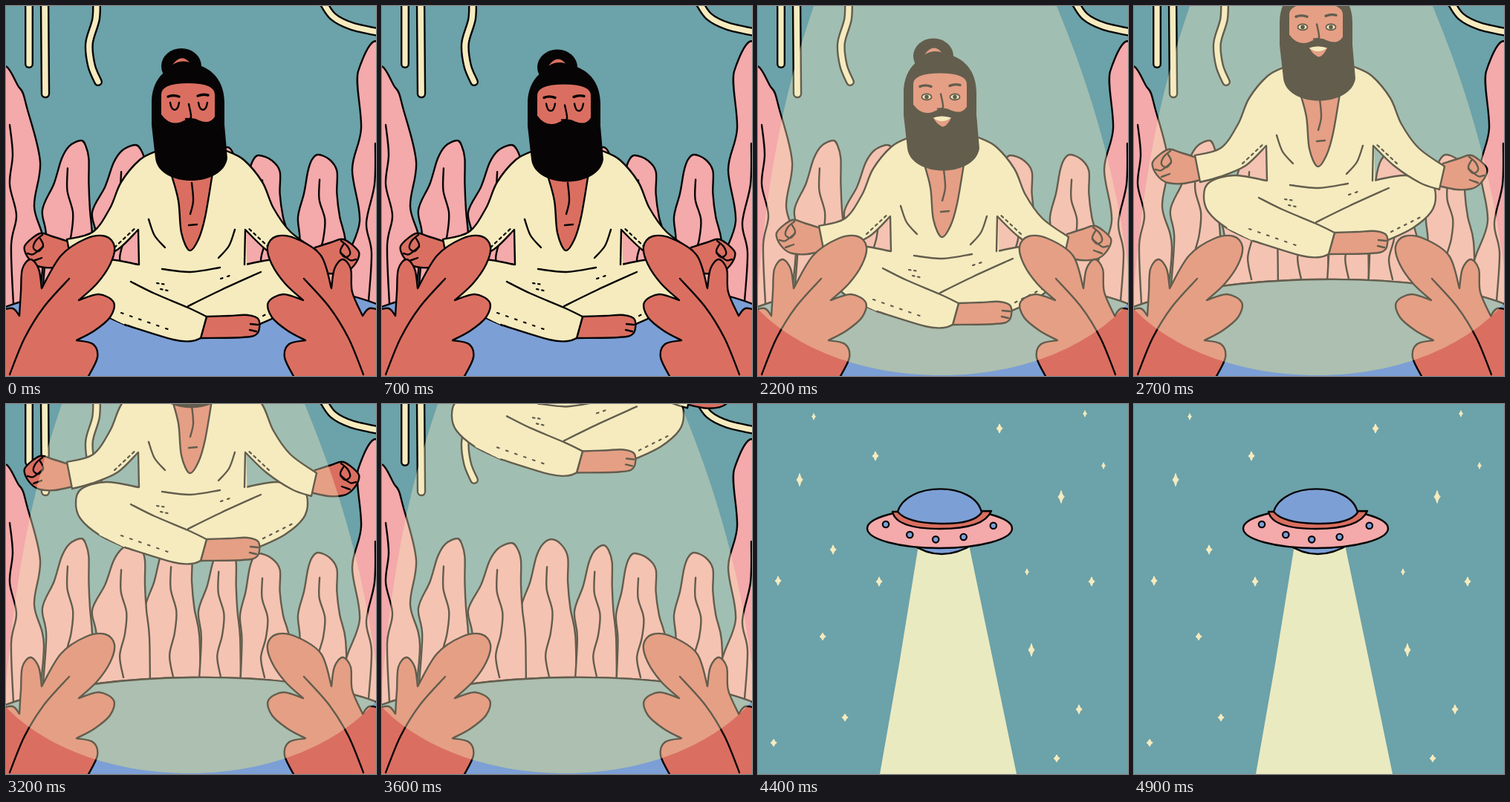
These frames come from a looping animation (498 by 498 pixels, 5000 ms). An HTML page:

```html
<!DOCTYPE html>
<html lang="en">
<head>
<meta charset="utf-8">
<title>Lifted</title>
<style>
  html, body { margin: 0; width: 100%; height: 100%; overflow: hidden; background: #6ca2a9; }
  svg { display: block; width: 100vw; height: 100vh; }
  path, circle, ellipse { stroke-linecap: round; stroke-linejoin: round; }
</style>
</head>
<body>
<svg id="stage" viewBox="0 0 498 498"></svg>
<script>
const INK = '#060405', SKY = '#6ca2a9', PINK = '#f4a9aa', CREAM = '#f5ebbe',
      SKIN = '#da6f61', FLOOR = '#7c9fd6', LIT_FLOOR = '#7da3a7', WEIGHT = 2.4;
const LOOP = 5000, STEP = 100, BEAM_ON = 2000, CUT = 3700;

const stage = document.getElementById('stage');
let layer = stage;

function el(tag, attrs, parent = layer) {
  const node = document.createElementNS('http://www.w3.org/2000/svg', tag);
  for (const k in attrs) node.setAttribute(k, attrs[k]);
  parent.appendChild(node);
  return node;
}
const group = (parent, attrs = {}) => (layer = el('g', attrs, parent));

// Smooth curve through the points; "|" marks a corner. Path data passes through.
function curve(text) {
  if (text[0] === 'M') return text;
  let d = '', last = null;
  for (const part of text.split('|')) {
    const p = part.trim().split(/\s+/).map(s => s.split(',').map(Number));
    if (last) p.unshift(last);
    else d = 'M' + p[0];
    for (let i = 0; i < p.length - 1; i++) {
      const a = p[i - 1] || p[i], b = p[i], c = p[i + 1], e = p[i + 2] || c;
      const at = (q, r, s, k) => [0, 1].map(n => (q[n] + k * (s[n] - r[n]) / 6).toFixed(1));
      d += `C${at(b, a, c, 1)} ${at(c, b, e, -1)} ${c}`;
    }
    last = p[p.length - 1];
  }
  return d;
}
const fill = (pts, color) => el('path', { d: curve(pts), fill: color });
const line = (pts, w = WEIGHT, color = INK) =>
  el('path', { d: curve(pts), fill: 'none', stroke: color, 'stroke-width': w });
const shape = (pts, color) => { fill(pts, color); line(pts); };
const lines = (...all) => all.forEach(p => line(p));
const sky = () => el('rect', { width: 498, height: 498, fill: SKY });

// Draws a part and its mirror image about x = axis / 2.
function pair(axis, part) {
  const home = layer;
  for (const k of [0, 1]) {
    group(home, k ? { transform: `translate(${axis} 0) scale(-1 1)` } : {});
    part(k);
  }
  layer = home;
}

// --- Garden -------------------------------------------------------------
const garden = group(stage);
sky();

function vine(pts, w) {
  line(pts, w);
  line(pts, w - 4.8, CREAM);
}
vine('31,-10 31,78', 12);
vine('52,-10 53,118', 12.5);
vine('122,-10 121,18 112,50 115,80 124,102', 12);
vine('425,-8 440,14 465,27 505,36', 12);

// A stalk spreads from its tip by shared wavy profiles, scaled per side.
const DEPTH = [.04, .13, .31, .5, .7, 1.1];
const LEFT = [.3, .5, .7, 1, .9, 1], RIGHT = [.4, .65, .65, .75, .95, 1];

function stalk(x, top, left, right) {
  const y = s => top + (368 - top) * s;
  const l = DEPTH.map((s, i) => `${x - left * LEFT[i]},${y(s)}`).reverse();
  const r = DEPTH.map((s, i) => `${x + right * RIGHT[i]},${y(s)}`);
  shape([...l, `${x},${top}`, ...r].join(' '), PINK);
  const rib = [];
  for (let s = .2; s < 1.1; s += .16)
    rib.push(`${x + (right - left) * .42 + 5 * Math.cos(s * 11)},${y(s)}`);
  line(rib.join(' '));
}
stalk(228, 182, 41, 34);
stalk(298, 190, 39, 18);
stalk(174, 187, 58, 20);
stalk(340, 201, 25, 44);
stalk(101, 181, 52, 16);
stalk(420, 200, 27, 39);

shape('-8,430 -8,105 18,110 29,140 46,210 38,270 51,325 40,430', PINK);
shape('506,430 506,72 474,88 478,165 466,220 476,290 456,352 460,430', PINK);
lines('5,160 9,200 5,240 14,282 7,322 10,402', '497,185 496,240 485,292 492,332 488,397');

const floor = 'M-6 407Q90 370 250 368T504 403V510H-6Z';
shape(floor, FLOOR);

const beam = 'M75 0C52 70 18 170 0 380V408C50 460 140 497 247 497C360 497 450 455 498 400V350C476 184 428 64 402 0Z';
el('path', { d: beam }, el('clipPath', { id: 'beam' }));
const pool = group(garden, { 'clip-path': 'url(#beam)' });
shape(floor, LIT_FLOOR);

// --- Sitting figure -----------------------------------------------------
const man = group(garden);

function stitches(x, y, dx, dy, n) {
  for (let i = 0; i < n; i++) {
    const a = x + dx * i, b = y + dy * i;
    line(`${a},${b} ${a + 2.5},${b + 2.5 * dy / dx}`, 2.2);
  }
}

pair(500, () => {
  const knee = '178,348 135,341 102,350 94,368 100,390 125,412 160,429';
  fill(knee + '|250,415|250,348|178,348', CREAM);
  line(knee);
});
shape('262,447|270,418|300,417 325,416 340,422 338,441 318,446 262,447', SKIN);
lines('329,428 339,429', '328,436 337,438');

const shin = '160,429 225,449 250,451 262,447|270,418|245,406 200,387 168,371';
fill(shin + '|125,412|160,429', CREAM);
fill('179,210|179,372|245,406|325,368|321,210|179,210', CREAM);
lines(shin, '245,404 290,382 343,358', '210,354 248,358 288,352');

// The mirrored arm hangs a little lower.
pair(500, k => {
  group(layer, { transform: `translate(0 ${8 * k})` });
  shape('84,317 62,310 46,306 28,319 25,329 34,344 46,351 66,352 90,347', SKIN);
  lines('49,308 40,316 37,326 44,330 50,322 46,313', '29,333 37,334 50,324', '37,343 48,339');
  layer = layer.parentNode;
  const arm = `203,195 180,207 155,237 140,272 117,304 82,${314 + 15 * k}|` +
              `89,${350 + 10 * k}|115,${343 + 8 * k} 150,328 178,301|179,348`;
  fill(arm + '|250,348|250,195|203,195', CREAM);
  line(arm);
  stitches(146, 325, 6, -5.6, 5);
  const y = 287 + 14 * k;
  line(`192,${y} 200,${y + 22} 214,${y + 38}`);
});
stitches(155, 413, 12, 4.2, 6);
stitches(346, 417, 9, -4.5, 5);
stitches(203, 373, 7, 1, 2);
stitches(208, 381, 7, 1.5, 2);
stitches(289, 367, 9, -3, 2);

shape('222,225|232,262 236,305 247,329 259,314 268,284 278,225', SKIN);
lines('250,238 252,262 248,280', '246,295 257,294');

const head = group(man);
el('ellipse', { cx: 236, cy: 81, rx: 27, ry: 24, fill: INK });
fill('M224 79Q236 63 247 76Q236 72 224 79', SKIN);
fill('M196 160V130C196 60 294 60 294 130V160L298 205C292 245 206 245 201 205Z', INK);
fill('M209 146V120Q208 104 245 104T281 120V149Q274 160 260 154Q250 148 240 154Q222 164 209 146', SKIN);
line('M218 122Q225 119 233 122', 3.4);
line('M258 121Q265 118 272 120', 3.4);
line('246,132 249,150 242,152');

const asleep = group(head);
for (const x of [227, 265]) line(`M${x - 6} 130C${x - 4} 143 ${x + 4} 143 ${x + 6} 130`);

const awake = group(head);
for (const x of [227, 265]) {
  el('ellipse', { cx: x, cy: 136, rx: 6.5, ry: 4, fill: CREAM, stroke: INK, 'stroke-width': 1.8 });
  el('circle', { cx: x, cy: 136, r: 2.8, fill: INK });
}
fill('M236 164Q247 160 260 164Q254 176 248 176Q240 172 236 164', SKIN);
fill('M236 164Q247 160 260 164Q247 173 236 164', CREAM);

// --- Foreground leaves and light ----------------------------------------
group(garden);
pair(498, k => {
  const d = 12 * k;
  const at = pts => pts.replace(/(\d+),/g, (_, x) => `${+x + d},`);
  shape('-8,410 9,407 18,417|' + at('20,385 22,354 33,341 44,354 48,380') +
        '|74,336 108,313 134,310 146,324 140,348 122,374 98,396' +
        '|125,388 145,399 140,419 119,437 95,450|117,455 123,473 110,500|-8,510|-8,410', SKIN);
  line(at('85,367 51,405 25,447 5,496'));
});
const light = el('path', { d: beam, fill: CREAM, opacity: .39 });

// --- Sky with saucer ----------------------------------------------------
const space = group(stage);
sky();

function stars(places, w, h) {
  for (const place of places.split(' ')) {
    const [x, y] = place.split(',').map(Number);
    const p = [];
    for (let i = 0; i < 8; i++) {
      const a = i * Math.PI / 4, r = i % 2 ? .58 : 1;
      p.push(`${x + w * r * Math.cos(a)} ${y + h * r * Math.sin(a)}`);
    }
    el('path', { d: `M${p.join('L')}Z`, fill: CREAM, stroke: CREAM, 'stroke-width': 1 });
  }
}
stars('56,102 408,125 368,331', 4, 8.5);
stars('158,70 325,33 101,196 27,238 163,239 449,239 432,411', 4, 6.2);
stars('87,313 117,422 21,456 402,477', 4, 5);
stars('75,17 440,13 465,83 362,226', 2.4, 4.2);

fill('M216 190L190 350L164 498H348L309 310L284 190Z', '#eaeac1');
shape('M206 188Q246 216 291 188Z', FLOOR);
el('ellipse', { cx: 244.5, cy: 167.5, rx: 97.5, ry: 26.5, fill: PINK, stroke: INK, 'stroke-width': WEIGHT });
shape('M181 145Q186 168 245 168T314 144Z', SKIN);
shape('M188 145C200 104 292 104 301 146Q290 162 245 161T188 145', FLOOR);
for (let i = 0; i < 5; i++) {
  const x = 172 + 31 * i + 1.3 * i * i;
  el('circle', { cx: x, cy: 182.5 - (x - 246) ** 2 / 267, r: 4.2, fill: FLOOR, stroke: INK, 'stroke-width': 2.2 });
}

// --- Motion -------------------------------------------------------------
function lift(t) {
  if (t < BEAM_ON) return 0;
  if (t < 2200) return 18 * ((t - BEAM_ON) / 200) ** 2;
  const u = t - 2200;
  return 18 + .162 * u + .000056 * u * u;
}
const show = (node, on) => { node.style.display = on ? '' : 'none'; };

function draw() {
  const t = Math.floor(performance.now() % LOOP / STEP) * STEP;
  const lit = t >= BEAM_ON;
  show(garden, t < CUT);
  show(space, t >= CUT);
  for (const node of [light, pool, awake]) show(node, lit);
  show(asleep, !lit);
  man.setAttribute('transform', `translate(0 ${-lift(t)})`);
  head.setAttribute('transform', `translate(0 ${t * .002})`);
  requestAnimationFrame(draw);
}
draw();
</script>
</body>
</html>
```
